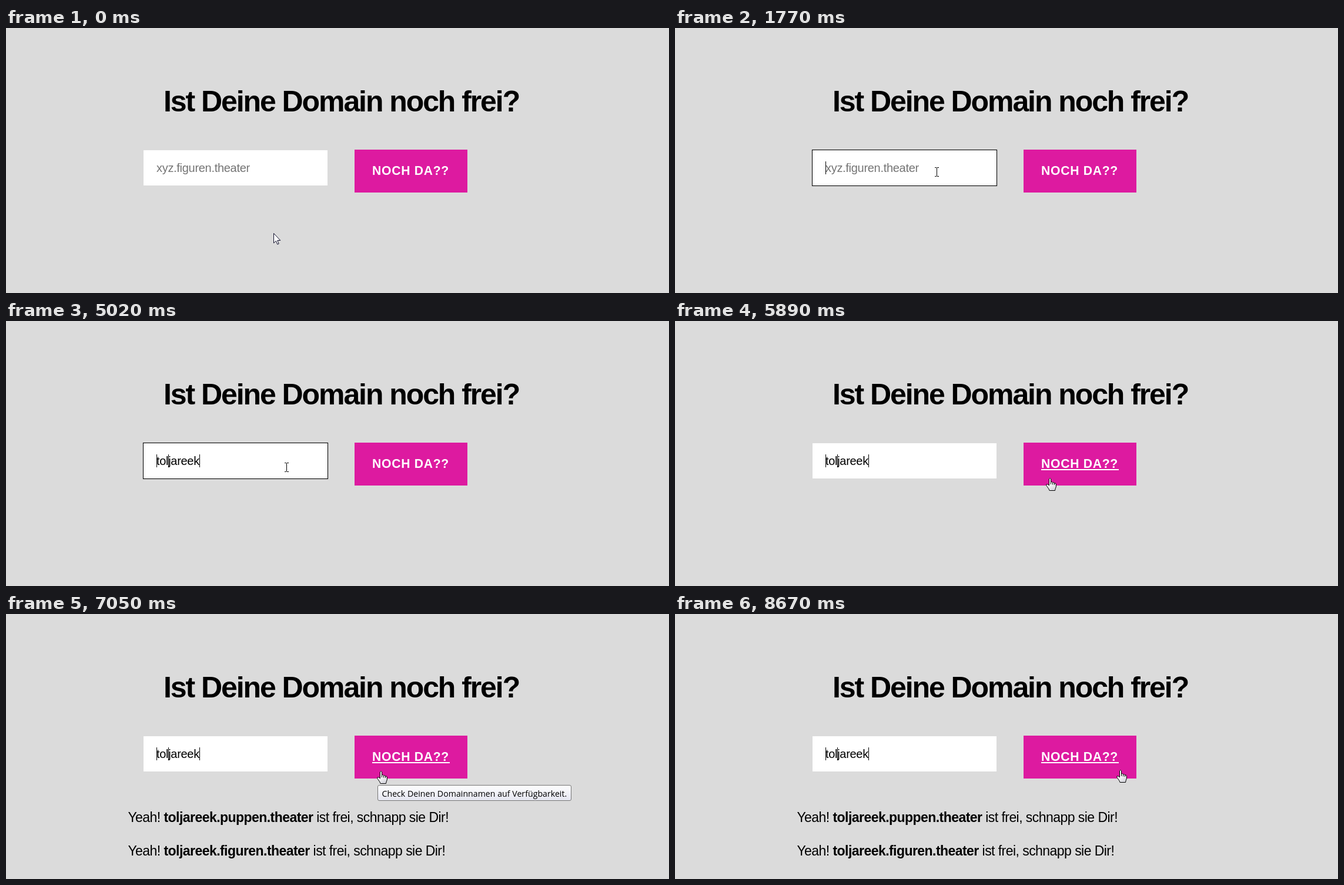
Recreate the animation shown at these times as an HTML page with a canvas. Size 1128 by 451 pixels, loop 9.93 s.

```html
<!DOCTYPE html>
<html lang="de">
<head>
<meta charset="utf-8">
<title>Domain-Check</title>
<style>
  html, body { margin: 0; width: 100%; height: 100%; overflow: hidden; background: #dbdbdb; }
  canvas { display: block; width: 1128px; height: 451px; }
</style>
</head>
<body>
<canvas id="stage" width="1128" height="451"></canvas>
<script>
const ctx = document.getElementById('stage').getContext('2d');
const LOOP = 9930;
const SANS = '"Liberation Sans", Arial, sans-serif';
const NAME = 'toljareek';
const KEY_TIMES = [2150, 2300, 2620, 2970, 3170, 3400, 3830, 3960, 4090];
const FOCUS = 1230, BLUR = 5890, RESULTS = 7010, TIP_ON = 7050, TIP_OFF = 8400;

const field = { x: 234, y: 208, w: 313, h: 60 };
const button = { x: 593, y: 207, w: 192, h: 73 };
const TEXT_X = 256;

// Pointer moves in discrete steps: the first at `start`, the last at `end`.
const moves = [
  { start: 530, end: 1000, steps: 7, from: [455, 349], to: [445, 245] },
  { start: 5020, end: 5460, steps: 6, from: [445, 245], to: [638, 267] },
  { start: 8400, end: 8670, steps: 5, from: [638, 267], to: [758, 265] }
];

const arrowPath = new Path2D('M.5 .5V17L4.4 13.4L6.8 19.2L9.2 18.2L6.8 12.5H11.8Z');
const handPath = new Path2D(
  'M5.5 1.8Q7 -.6 8.5 1.8V7Q10.6 6 11.5 7.9Q13.6 7 14.4 9Q17.2 8.5 17.4 11V15' +
  'Q16 18 15.5 21.5H6Q5.5 19 3 16Q.2 13 .8 11.2Q2.6 9.6 5.5 12.8Z');
const knucklePath = new Path2D('M8.5 7V11M11.5 8V11.5M14.4 9V12');

function rect(r, color) {
  ctx.fillStyle = color;
  ctx.fillRect(r.x, r.y, r.w, r.h);
}

function setFont(font, spacing = 0) {
  ctx.font = font;
  ctx.letterSpacing = spacing + 'px';
}

function text(str, x, y, color = '#000') {
  ctx.fillStyle = color;
  ctx.fillText(str, x, y);
  return x + ctx.measureText(str).width;
}

function contains(r, [x, y]) {
  return x >= r.x && x < r.x + r.w && y >= r.y && y < r.y + r.h;
}

function pointerAt(t) {
  let pos = moves[0].from;
  for (const { start, end, steps, from, to } of moves) {
    if (t < start) break;
    const done = 1 + Math.floor((t - start) / (end - start) * (steps - 1) + 1e-6);
    const p = Math.min(1, done / steps);
    pos = from.map((v, i) => Math.round(v + (to[i] - v) * p));
  }
  return pos;
}

function caret(count) {
  const x = Math.round(TEXT_X + ctx.measureText(NAME.slice(0, count)).width);
  rect({ x, y: 227, w: 1, h: 22 }, '#000');
}

function drawField(t) {
  if (t >= FOCUS && t < BLUR) {
    rect({ x: 232, y: 206, w: 317, h: 64 }, '#d2d2d2');
    rect({ x: 233, y: 207, w: 315, h: 62 }, '#000');
  }
  rect(field, '#fff');
  setFont('20px ' + SANS, -0.3);
  const typed = KEY_TIMES.filter(k => t >= k).length;
  if (typed) text(NAME.slice(0, typed), TEXT_X, 245);
  else text('xyz.figuren.theater', TEXT_X, 245, '#757575');

  // Two earlier caret marks stay visible next to the live one.
  if (t >= FOCUS) caret(0);
  if (typed > 3) caret(3);
  if (typed) caret(typed);
}

function drawButton(hover) {
  rect(button, '#dd1aa0');
  setFont('bold 21.17px ' + SANS, 0.705);
  text('NOCH DA??', 623, 250, '#fff');
  if (hover) rect({ x: 623, y: 252, w: 132, h: 2 }, '#fff');
}

function drawResult(kind, y) {
  const size = 23, spacing = -0.55;
  setFont(`${size}px ${SANS}`, spacing);
  let x = text('Yeah! ', 207.4, y);
  setFont(`bold ${size}px ${SANS}`, spacing);
  x = text(`${NAME}.${kind}.theater`, x, y);
  setFont(`${size}px ${SANS}`, spacing);
  text(' ist frei, schnapp sie Dir!', x, y);
}

function drawTooltip() {
  const fill = ctx.createLinearGradient(0, 291, 0, 318);
  fill.addColorStop(0, '#fff');
  fill.addColorStop(1, '#e4e5f0');
  ctx.beginPath();
  ctx.roundRect(632.5, 291.5, 329, 26, 2.5);
  ctx.fillStyle = fill;
  ctx.fill();
  ctx.strokeStyle = '#767676';
  ctx.lineWidth = 1;
  ctx.stroke();
  setFont('14.18px "Open Sans", "Noto Sans", sans-serif');
  text('Check Deinen Domainnamen auf Verfügbarkeit.', 639.5, 311);
}

function drawBeam(x, y) {
  for (const end of [y - 8, y + 7]) {
    rect({ x: x - 3, y: end, w: 3, h: 1 }, '#000');
    rect({ x: x + 1, y: end, w: 3, h: 1 }, '#000');
  }
  rect({ x, y: y - 7, w: 1, h: 14 }, '#000');
}

function drawShape(path, x, y, fill, stroke) {
  ctx.save();
  ctx.translate(x, y);
  ctx.lineWidth = 1;
  ctx.lineJoin = 'round';
  ctx.fillStyle = fill;
  ctx.strokeStyle = stroke;
  ctx.fill(path);
  ctx.stroke(path);
  ctx.restore();
}

function drawHand(x, y) {
  const shade = ctx.createLinearGradient(4, 4, 15, 21);
  shade.addColorStop(0.3, '#fff');
  shade.addColorStop(1, '#d0d0d8');
  drawShape(handPath, x - 7, y, shade, '#000');
  drawShape(knucklePath, x - 7, y, 'transparent', '#000');
}

function draw(t) {
  const pos = pointerAt(t);
  const hover = contains(button, pos);
  rect({ x: 0, y: 0, w: 1128, h: 451 }, '#dbdbdb');
  setFont('bold 50px ' + SANS, -2.078);
  text('Ist Deine Domain noch frei?', 268, 142);
  drawField(t);
  drawButton(hover);
  if (t >= RESULTS) {
    drawResult('puppen', 354);
    drawResult('figuren', 411);
  }
  if (t >= TIP_ON && t < TIP_OFF) drawTooltip();

  if (hover) drawHand(...pos);
  else if (contains(field, pos)) drawBeam(...pos);
  else drawShape(arrowPath, ...pos, '#fff', '#10102c');
}

const began = performance.now();
function tick() {
  draw((performance.now() - began) % LOOP);
  requestAnimationFrame(tick);
}
tick();
</script>
</body>
</html>
```
